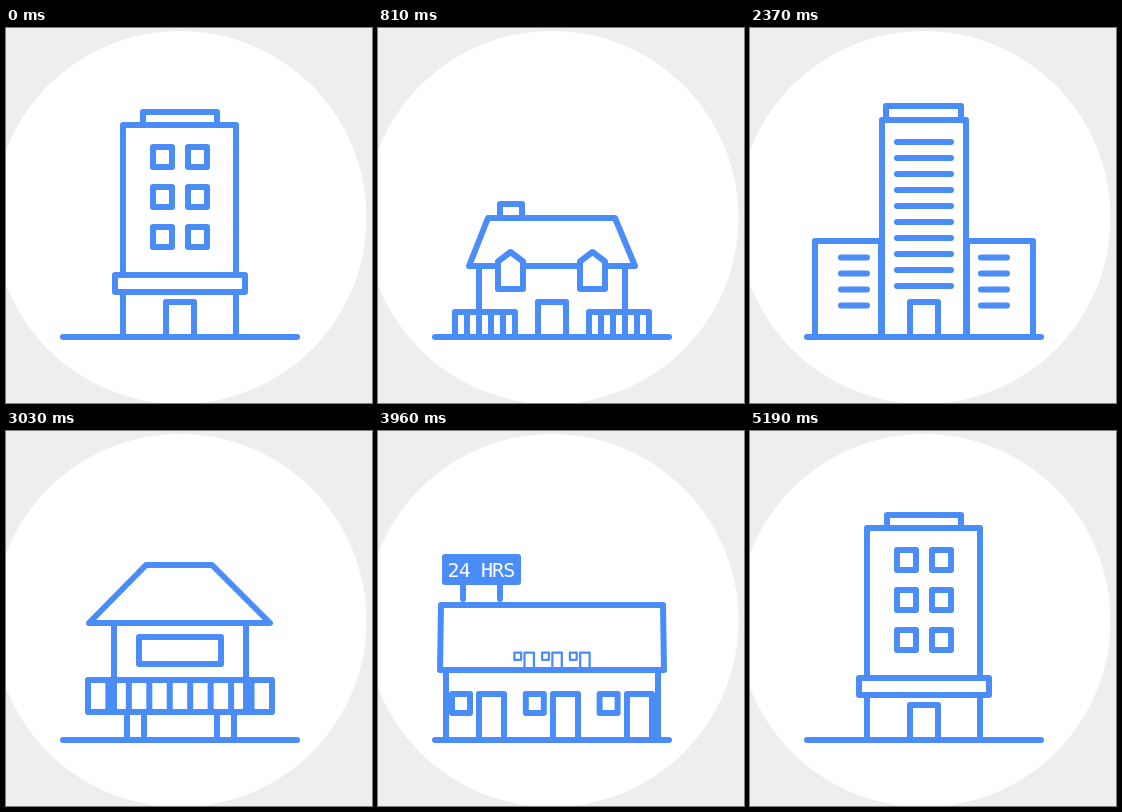
Write an HTML page that moves like this. It is 366 by 375 pixels and loops after 5490 ms.

```html
<!DOCTYPE html>
<html lang="en">
<head>
<meta charset="utf-8">
<title>Buildings</title>
<style>
  html, body { margin: 0; width: 100%; height: 100%; overflow: hidden; background: #eee; }
  svg { display: block; width: 100%; height: 100%; }
  #stage { fill: none; stroke: #4a8cf8; stroke-width: 6; stroke-linecap: round; stroke-linejoin: round; }
  #stage .solid { fill: #fff; }
  #stage [data-part] { transform-box: fill-box; transform-origin: 50% 100%; }
  #stage .mid { transform-origin: 50% 50%; }
  text { font: 20px "DejaVu Sans Mono", monospace; fill: #fff; stroke: none; }
</style>
</head>
<body>
<svg viewBox="0 0 366 375">
  <circle cx="174" cy="189.5" r="186.5" fill="#fff"/>
  <g id="stage"></g>
</svg>
<script>
const LOOP = 5490, STEP = 30;

const repeat = (n, draw) => Array.from({ length: n }, (_, i) => draw(i)).join('');
const path = (d, attrs = '') => `<path d="${d}" ${attrs}/>`;
const box = (x, y, w, h, attrs = '') => `<rect x="${x}" y="${y}" width="${w}" height="${h}" ${attrs}/>`;
const part = (name, content) => `<g data-part="${name}">${content}</g>`;
const dash = (name, x, y, w) => path(`M${x} ${y}h${w}`, `data-part="${name}" class="mid"`);

const fence = x => path(`M${x} 309V284h60v25`) + repeat(4, i => path(`M${x + 12 + 12 * i} 284v25`));
const dormer = x => path(`M${x} 261V233.5l12.5-9.5 12.5 9.5V261z`, 'class="solid mid" data-part="dormer"');
const rooms = repeat(3, i =>
  box(74 + 73.8 * i, 263, 18, 19) + path(`M${101 + 74 * i} 309V263h25v46z`));

const hotel =
  part('hotel', box(137, 84, 74, 13) + box(117, 97, 113, 212, 'class="solid"')) +
  box(109, 247, 130, 17, 'class="solid mid" data-part="band"') +
  repeat(6, i => box(147 + 35 * (i % 2), 119 + 40 * (i >> 1), 19, 20, 'class="mid" data-part="pane"'));

const house =
  part('house', path('M101 238V309M247 238V309') + box(122, 176, 22, 14) +
    path('M110 190H237L257 238H91z', 'class="solid"')) +
  dormer(120) + dormer(202) +
  part('fence', fence(77) + fence(211));

const tower =
  part('wingL', box(65, 213, 66, 96)) +
  part('wingR', box(217, 213, 66, 96)) +
  repeat(4, i => dash('slit', 91, 229.5 + 16 * i, 26) + dash('slit', 231, 229.5 + 16 * i, 26)) +
  part('tower', box(136, 78, 75, 14) + box(132, 92, 84, 217, 'class="solid"')) +
  repeat(10, i => dash('floor', 147, 114 + 16 * i, 54));

const hut =
  part('hut', path('M108 192V281M240 192V281M121 281V309M138 281V309M211 281V309M228 281V309') +
    path('M140 134H206L264 192H83z')) +
  box(133, 206, 82, 27, 'class="mid" data-part="view"') +
  `<g class="mid" data-part="railing">${box(82, 249, 184, 32)}${
    repeat(8, i => path(`M${102.4 + 20.45 * i} 249v32`))}</g>`;

const motel =
  part('sign', path('M85 154V168M122 154V168') + box(67, 126, 73, 25, 'fill="#4a8cf8"') +
    '<text x="69.5" y="146" letter-spacing="-0.9">24 HRS</text>') +
  part('motel', path('M68 239V309M280 239V309') +
    path('M63 174H285L286 239H62z', 'class="solid"')) +
  part('lower', rooms) +
  `<g transform="translate(0 -70)">${part('upper', rooms)}</g>`;

const stage = document.getElementById('stage');
stage.innerHTML = hotel + house + tower + hut + motel +
  part('door', path('M160 309V274h28v35z')) + path('M57 309H291');

const both = v => `scale(${v})`;
const tall = v => `scale(1,${v})`;
const wide = v => `scale(${v},1)`;
const slide = dir => v => `translate(${dir * 66 * (1 - v)}px,0)`;

// name: [enter, duration, overshoot, leave, duration, pose]
const parts = {
  hotel:   [4770, 330, 1.1, 120, 210, tall],
  band:    [4890, 270, 0.8, 60, 180, wide],
  pane:    [4950, 240, 1.2, 30, 150, both],
  door:    [4830, 270, 0.8, 2370, 180, tall],
  house:   [300, 330, 1.1, 930, 180, both],
  dormer:  [510, 300, 1.3, 870, 150, both],
  fence:   [480, 330, 1.4, 840, 180, both],
  tower:   [1050, 360, 1.1, 2430, 210, tall],
  floor:   [1440, 290, 0.9, 2370, 150, wide],
  wingL:   [1500, 240, 0.3, 2400, 150, slide(1)],
  wingR:   [1500, 240, 0.3, 2400, 150, slide(-1)],
  slit:    [1740, 420, 1.2, 2370, 120, wide],
  hut:     [2610, 300, 0.8, 3450, 210, both],
  view:    [2760, 270, 1.2, 3210, 210, both],
  railing: [2760, 270, 1.7, 3180, 270, both],
  motel:   [3660, 300, 0.9, 4560, 210, both],
  lower:   [3720, 240, 0.6, 4500, 180, both],
  sign:    [3780, 180, 0.5, 4470, 180, both],
  upper:   [3930, 300, 1.3, 4380, 180, both],
};

const backOut = (p, s) => 1 + (s + 1) * (p - 1) ** 3 + s * (p - 1) ** 2;
const since = (t, start) => (t - start + LOOP) % LOOP;

function amount(t, [enter, inTime, over, leave, outTime]) {
  const age = since(t, enter), life = since(leave, enter);
  if (age < inTime) return Math.max(0, backOut(age / inTime, over));
  if (age < life) return 1;
  return 1 - Math.min(1, (age - life) / outTime) ** 2;
}

const actors = [...stage.querySelectorAll('[data-part]')].map(el => [el, parts[el.dataset.part]]);

function draw(now) {
  const t = Math.floor((now % LOOP) / STEP) * STEP;
  for (const [el, spec] of actors) {
    const v = amount(t, spec);
    el.style.display = v > 0.005 ? '' : 'none';
    el.style.transform = spec[5](v);
  }
}

const start = performance.now();
function tick() {
  draw(performance.now() - start);
  requestAnimationFrame(tick);
}
tick();
</script>
</body>
</html>
```
